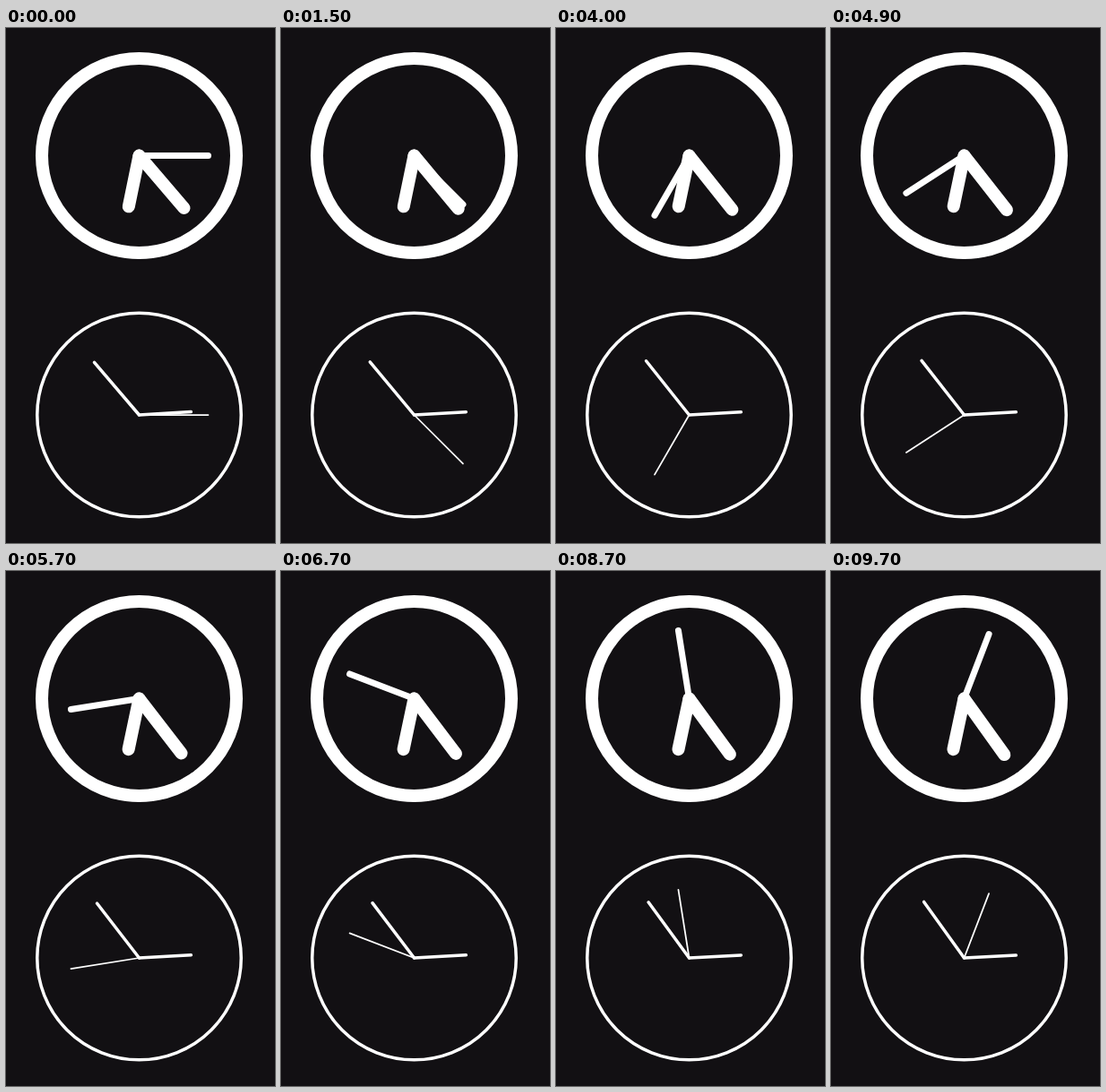
Write an HTML page that moves like this. It is 300x575 px and loops after 9.8 s.

```html
<!DOCTYPE html>
<html lang="en">
<head>
<meta charset="utf-8">
<title>Two clocks</title>
<style>
  html, body { margin: 0; width: 100%; height: 100%; overflow: hidden; background: #121013; }
  svg { display: block; }
  g { fill: none; stroke: #fff; stroke-linecap: round; }
</style>
</head>
<body>
<svg width="300" height="575" viewBox="0 0 300 575"></svg>
<script>
const LOOP = 9800, STEP = 100, DEGREES_PER_STEP = 3;
const OUTER_RADIUS = 115.5, LONG = 77, SHORT = 58;
const svg = document.querySelector('svg');

function add(parent, tag, attributes) {
  const node = document.createElementNS('http://www.w3.org/2000/svg', tag);
  for (const name in attributes) node.setAttribute(name, attributes[name]);
  return parent.appendChild(node);
}

// Returns a function that turns the hands by the seconds hand's angle.
function makeClock(y, weight, hour, minute) {
  const face = add(svg, 'g', { transform: `translate(148.5 ${y})`, 'stroke-width': weight });
  add(face, 'circle', { r: OUTER_RADIUS - weight / 2 });
  const hand = (length, width) => add(face, 'line', { y2: -length, 'stroke-width': width });
  const hands = [hand(SHORT, weight), hand(LONG, weight), hand(LONG, weight / 2)];
  return seconds => {
    const minutes = minute * 6 + seconds / 60;
    const angles = [hour * 30 + minutes / 12, minutes, seconds];
    hands.forEach((line, i) => line.setAttribute('transform', `rotate(${angles[i]})`));
  };
}

const clocks = [makeClock(142.5, 14, 6, 23), makeClock(432, 3.5, 2, 53)];
const start = performance.now();

function draw() {
  const time = (performance.now() - start) % LOOP;
  const seconds = 90 + Math.floor(time / STEP) * DEGREES_PER_STEP;
  clocks.forEach(turn => turn(seconds));
  requestAnimationFrame(draw);
}
draw();
</script>
</body>
</html>
```
